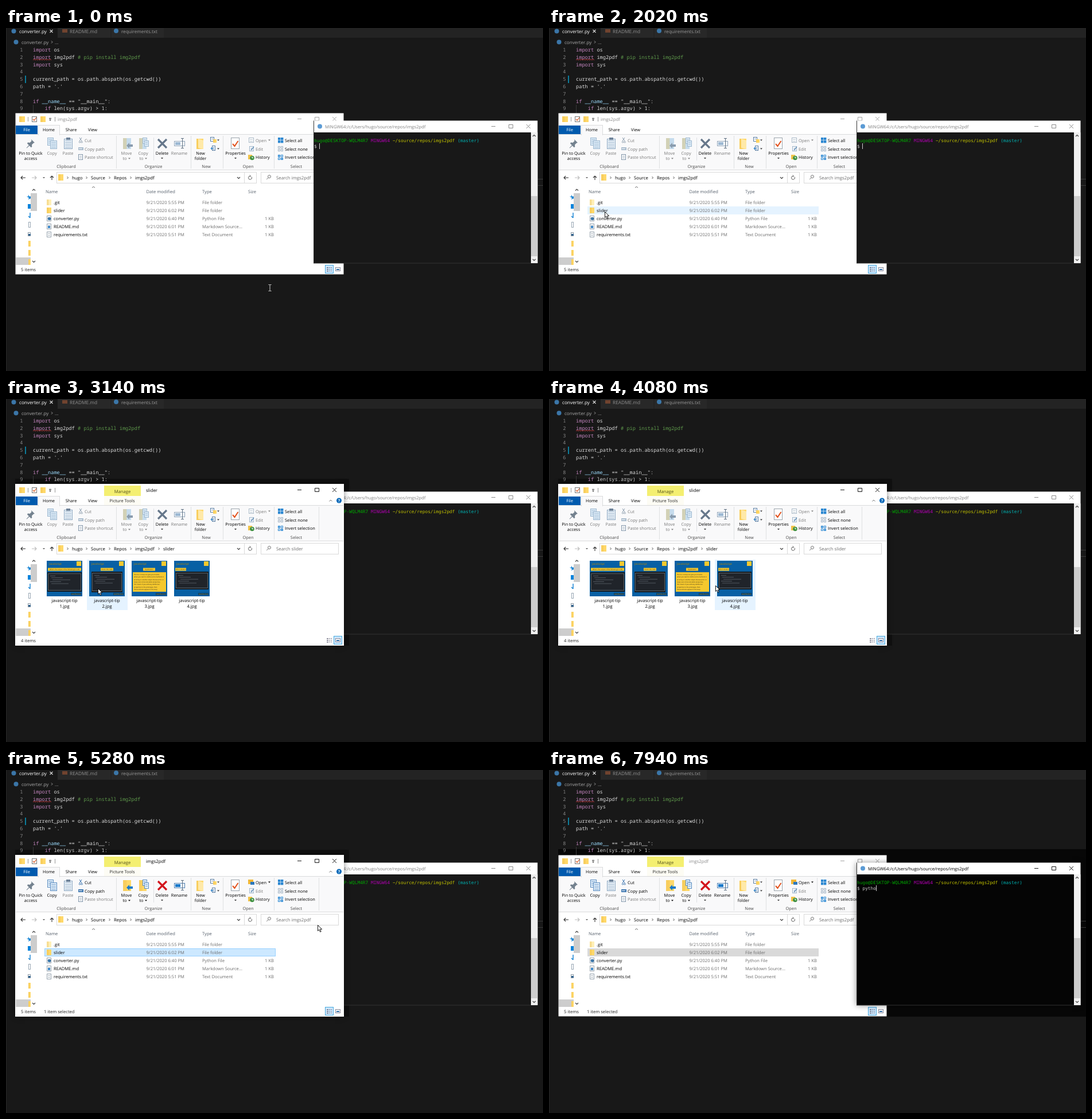
An HTML page with a canvas for the animation above (8000 ms loop, 936 by 598 pixels).

```html
<!DOCTYPE html>
<html lang="en">
<head>
<meta charset="utf-8">
<title>Desktop session</title>
<style>
  html, body { margin: 0; width: 100%; height: 100%; overflow: hidden; background: #181818; }
  canvas { display: block; }
</style>
</head>
<body>
<canvas id="stage" width="936" height="598"></canvas>
<script>
const g = document.getElementById('stage').getContext('2d');
const LOOP = 8000;
const USER = 'hugo', HOST = 'DESKTOP-WQLM4R7';

const ui = size => `${size}px "Open Sans", "Noto Sans", sans-serif`;
const CODE = '8.67px "Noto Sans Mono", "DejaVu Sans Mono", monospace';
const TERM = '7.84px "DejaVu Sans Mono", monospace';
const GREY = '#6d6d6d', BLUE = '#1979ca', GOLD = '#ffd869';

// Drawing helpers
function rect(color, x, y, w, h) {
  g.fillStyle = color;
  g.fillRect(x, y, w, h);
}
function frame(color, x, y, w, h, fillColor) {
  if (fillColor) rect(fillColor, x, y, w, h);
  g.strokeStyle = color;
  g.lineWidth = 1;
  g.strokeRect(x + .5, y + .5, w - 1, h - 1);
}
function fill(color, d) {
  g.fillStyle = color;
  g.fill(new Path2D(d));
}
function line(color, d, width = 1) {
  g.strokeStyle = color;
  g.lineWidth = width;
  g.stroke(new Path2D(d));
}
function dot(color, x, y, r) {
  g.fillStyle = color;
  g.beginPath();
  g.arc(x, y, r, 0, 7);
  g.fill();
}
function text(s, x, y, color = '#000', font = ui(7.6), align = 'left') {
  g.font = font;
  g.textAlign = align;
  g.fillStyle = color;
  g.fillText(s, x, y);
}
const label = (s, x, y, color = '#000') => text(s, x, y, color, ui(7.4));
const caption = (s, x, y, color = '#000') => text(s, x, y, color, ui(7.4), 'center');
const drop = (x, y, color = '#333') => fill(color, `M${x - 2} ${y}h4l-2 2.2z`);
const chevron = (x, y, color = '#555') => line(color, `M${x - 1} ${y - 2}l2 2-2 2`);
const arrowUp = (x, y) => line('#444', `M${x - 2.5} ${y + 1.5}l2.5-2.5 2.5 2.5`, 1.2);
const arrowDown = (x, y) => line('#444', `M${x - 2.5} ${y - 1.5}l2.5 2.5 2.5-2.5`, 1.2);

function folder(x, y, w, h, color = GOLD) {
  rect(color, x, y, w, h);
  rect('#e9b94a55', x, y, w * .45, h);
}
function sheet(x, y, w, h, edge = '#9ab0c4', color = '#fff') {
  frame(edge, x, y, w, h, color);
  for (let i = 3; i < h - 2; i += 3) rect(edge, x + 2, y + i, w - 4, .8);
}
function windowButtons(x, y, color) {
  line(color, `M${x} ${y + .5}h7M${x + 30.5} ${y - 2.5}h7v6h-7zM${x + 61} ${y - 3}l7 7m0-7l-7 7`, .9);
}
function windowBox(x, y, w, h, color, active) {
  g.save();
  if (active) {
    g.shadowColor = 'rgba(0,0,0,.45)';
    g.shadowBlur = 10;
  }
  rect(color, x, y, w, h);
  g.restore();
}

// front: which window has the focus, its shadow darkens the ground around it
function editor(front) {
  rect('#181818', 0, 0, 936, 598);
  rect('#232323', 90, 0, 846, 17);
  rect('#282828', 90, 0, 92, 17);
  rect('#282828', 184, 0, 91, 17);
  rect('#262626', 0, 0, 1, 598);
  if (front === 'explorer') rect('#101010', 16, 139, 582, 291);
  if (front === 'terminal') rect('#070707', 16, 138, 920, 292);
  rect('#3a3a3a', 927, 263, 9, 1);
  rect('#3a3a3a', 927, 274, 9, 1);

  dot('#3b76a8', 13.5, 5.5, 4);
  text('converter.py', 23, 9, '#fff', ui(8.2));
  line('#ddd', 'M76.5 3l5 5m0-5l-5 5', 1.1);
  rect('#70432f', 98, 2, 9, 6);
  text('README.md', 111, 9, '#8f8f8f', ui(8.3));
  dot('#3b76a8', 192, 5, 4);
  text('requirements.txt', 201, 9, '#9a9a9a', ui(8.05));
  dot('#3b76a8', 17.5, 24.5, 4);
  text('converter.py', 27, 27.5, '#a9a9a9', ui(8.1));
  chevron(80, 24.5, '#a9a9a9');
  text('...', 85, 27.5, '#a9a9a9', ui(8.1));

  const source = ['import os', 'import img2pdf # pip install img2pdf', 'import sys', '',
    'current_path = os.path.abspath(os.getcwd())', "path = '.'", '',
    'if __name__ == "__main__":', '    if len(sys.argv) > 1:'];
  const inks = { import: '#c586c0', if: '#c586c0', __name__: '#9cdcfe' };
  source.forEach((s, i) => {
    const y = 41 + 12.8 * i;
    text(i + 1, 29.5, y, '#858585', CODE, 'right');
    let x = 47;
    for (const part of s.split(/(#.*| )/)) {
      text(part, x, y, part[0] === '#' ? '#5f9a4c' : inks[part] || '#dcdcdc', CODE);
      x += part.length * 5.2;
    }
  });
  let wave = 'M47 56';
  for (let i = 0; i < 8; i++) wave += 'l2-1.5 2 1.5';
  line('#d23c3c', wave, .8);
  rect('#0c7d9d', 33, 83, 2, 13);
  rect('#3a3a3a', 47, 134, 1, 16);
}

function terminal(active, typed, caret) {
  const ink = active ? '#000' : '#808080';
  windowBox(536, 161.5, 390.5, 248.5, '#fff', active);
  rect(active ? '#050505' : '#181818', 536, 182, 379, 228);
  rect('#333', 536, 161.5, 1, 248.5);
  rect('#333', 536, 409.5, 390, 1);
  dot('#5b9bd5', 547, 171.5, 4);
  text(`MINGW64:/c/Users/${USER}/source/repos/imgs2pdf`, 556, 174.5, ink, ui(7.7));
  windowButtons(846, 171, ink);
  rect('#f0f0f0', 915, 182, 11.5, 228);
  rect('#cdcdcd', 915, 293, 11, 105);
  arrowUp(920.5, 187.5);
  arrowDown(920.5, 404.5);

  let x = 537;
  const prompt = [[`${USER}@${HOST} `, '#00a800'], ['MINGW64 ', '#b000b0'],
    ['~/source/repos/imgs2pdf ', '#bfbf00'], ['(master)', '#00b0b0']];
  for (const [s, color] of prompt) {
    text(s, x, 199, color, TERM);
    x += s.length * 4.72;
  }
  text('$ ' + typed, 537, 208.5, '#c8c8c8', TERM);
  if (caret) rect('#d0d0d0', Math.round(546.4 + typed.length * 4.72), 201, 1, 10);
}

function titleBar({ active, manage, place }) {
  const ink = active ? '#000' : '#8a8a8a';
  folder(23, 154, 10, 10);
  rect('#999', 38, 155, 1, 8);
  frame('#777', 45, 154, 9, 10, '#fff');
  line('#d9541e', 'M47 159l2 2 4-5', 1.2);
  folder(60, 154, 9, 10);
  rect('#333', 75, 157, 4, 1);
  drop(77, 159.5);
  rect('#999', 85, 155, 1, 8);
  if (manage) {
    rect('#f4ef70', 171, 151, 64, 18);
    text('Manage', 203, 163.5, '#55511d', ui(7.7), 'center');
    rect('#fdfcf4', 171, 169, 64, 16);
    text('Picture Tools', 202.5, 180, '#222', ui(7.4), 'center');
  }
  text(place, manage ? 244 : 90, 161.5, ink, ui(7.8));
  windowButtons(508, 158, active ? '#000' : '#999');
}

function ribbon(sel) {
  const dim = sel ? '#000' : '#7b7b7b', off = '#7b7b7b';
  const edge = sel ? '#5a8cc0' : '#9fb9d0', soft = sel ? '#e4f0fb' : '#d8e8f5';
  rect('#f9f9fa', 17, 185, 571, 63);
  rect('#dadbdc', 17, 185, 571, 1);
  rect('#dadbdc', 17, 247, 571, 1);
  rect('#005aae', 17, 170, 38, 15);
  text('File', 36, 180, '#fff', ui(7.4), 'center');
  frame('#dadbdc', 56, 169, 38, 18, '#f9f9fa');
  rect('#f9f9fa', 57, 185, 36, 3);
  caption('Home', 74.5, 180);
  caption('Share', 113.5, 180);
  caption('View', 151, 180);
  line('#777', 'M563.5 178.5l2.5-2.5 2.5 2.5');
  dot('#0067b8', 580.5, 177, 4.5);
  text('?', 580.5, 179.7, '#fff', 'bold ' + ui(7.4), 'center');

  for (const x of [192, 322, 378, 467, 545]) rect('#dfe0e2', x, 188, 1, 57);
  rect('#dfe0e2', 257, 191, 1, 40);
  [['Clipboard', 105], ['Organize', 257], ['New', 349], ['Open', 422], ['Select', 506]]
    .forEach(([s, x]) => caption(s, x, 243.5, '#4a4a4a'));

  fill('#74828f', 'M44 194l6 6-2 .6-3 3 .3 3.4-1.6 1.2-3-3-4.5 4.3-.6-.6 4.3-4.7-3-3 1.2-1.6 3.4.3 3-3z');
  caption('Pin to Quick', 43, 221);
  caption('access', 43, 230);
  sheet(72, 191, 11, 14, edge, soft);
  sheet(77, 196, 12, 15, edge, soft);
  caption('Copy', 80, 221, dim);
  sheet(101, 193, 15, 18, '#8fa9c2', '#eaf2f9');
  rect('#6f8399', 105, 191, 7, 4);
  caption('Paste', 108, 221, off);

  line(sel ? '#3d76b0' : '#8fa0b0', 'M128 191l4 6m0-6l-4 6M128.5 197.5a1.3 1.3 0 1 0 .1 0M132 197.5a1.3 1.3 0 1 0 .1 0');
  rect(sel ? '#3d76b0' : '#a9bccd', 126, 208, 9, 5);
  rect('#fff', 127, 210, 6, 1);
  sheet(126, 220, 8, 10, '#8094a8', '#fff');
  label('Cut', 137, 198.5, dim);
  label('Copy path', 137, 213.5, dim);
  label('Paste shortcut', 137, 228, off);

  folder(204, 192, 14, 19, sel ? GOLD : '#c6dced');
  fill(sel ? '#1979ca' : '#8a9cae', 'M210 205l5-5v3h6v4h-6v3z');
  caption('Move', 210, 221, dim);
  caption('to', 207, 230, dim);
  drop(215, 226.5, dim);
  folder(232, 192, 13, 19, sel ? GOLD : '#c6dced');
  sheet(238, 191, 8, 11, edge, soft);
  sheet(241, 196, 8, 11, edge, soft);
  caption('Copy', 239, 221, dim);
  caption('to', 236, 230, dim);
  drop(244, 226.5, dim);
  line(sel ? '#d3141c' : '#66778b', 'M265 194l15 15m0-15l-15 15', 3.2);
  caption('Delete', 272, 221);
  drop(272, 226);
  frame(sel ? '#4b7db1' : '#8ea3b8', 293, 197, 19, 9, '#fff');
  rect(sel ? BLUE : '#9db9d3', 295, 199, 9, 5);
  line('#5d6e80', 'M305 192.5h5M307.5 192.5v17M305 209.5h5');
  caption('Rename', 302, 221, dim);

  folder(332, 193, 12, 18);
  fill('#ffe9a8', 'M335 193l9 3v15l-9-2z');
  caption('New', 339, 221);
  caption('folder', 339, 230);
  sheet(356, 190, 7, 8, '#5a7ea3');
  folder(361, 194, 6, 6);
  sheet(359, 205, 6, 9, '#5a7ea3');
  line('#1979ca', 'M362 210h-5m2-2l-2 2 2 2');
  drop(370, 194.5);
  drop(370, 209.5);

  frame('#9aa3ab', 392, 191, 15, 20, '#fff');
  line('#e2511c', 'M395 202l3.5 4 6-9', 2);
  caption('Properties', 400, 221);
  drop(400, 226);
  if (sel) folder(422, 191, 9, 8, '#f3b631');
  else sheet(423, 191, 9, 9, '#aab9c7');
  if (sel) rect('#2c78bd', 426, 195, 7, 5);
  sheet(424, 206, 8, 9, '#9db4c8');
  line('#5f8cb5', 'M427 213l5-6', 1.3);
  folder(422, 221, 7, 8, '#f3c64b');
  dot('#3f9142', 429, 226.5, 3.8);
  line('#fff', 'M429 224v2.5h2');
  label('Open', 435, 198.5, dim);
  drop(459, 194.5, dim);
  label('Edit', 435, 213.5, off);
  label('History', 435, 228);

  for (let i = 0; i < 4; i++) {
    const x = 474 + i % 2 * 5, y = 191 + (i >> 1) * 5;
    rect('#2b87d1', x, y, 4.4, 4.4);
    frame('#a3b4c4', x, y + 15, 4, 4);
    frame('#2b87d1', x, y + 30, 4, 4, i % 3 ? '#fff' : '#7db9e8');
  }
  label('Select all', 486, 198.5);
  label('Select none', 486, 213.5);
  label('Invert selection', 486, 228);
}

function addressBar({ view, place, crumbHot }) {
  line('#333', 'M34 261h-8m3-3l-3 3 3 3', 1.1);
  line('#bbb', 'M45 261h8m-3-3l3 3-3 3', 1.1);
  drop(66, 260, '#666');
  line('#333', 'M80 265v-7m-3 3l3-3 3 3', 1.1);
  frame('#d9d9d9', 88, 251, 328, 20);
  frame('#d9d9d9', 415, 251, 22, 20);
  frame('#d9d9d9', 444, 251, 136, 20);
  folder(91, 255, 9, 11);
  if (crumbHot) frame('#99d1ff', 222, 251, 40, 20, '#cce8ff');
  const crumbs = [[USER, 115], ['Source', 148], ['Repos', 188], ['imgs2pdf', 225]];
  if (view === 'thumbs') crumbs.push(['slider', 274]);
  for (const [s, x] of crumbs) {
    chevron(x - 7.5, 261);
    text(s, x, 263.5, '#000', ui(7.75));
  }
  arrowDown(405.5, 261.5);
  line('#555', 'M428 259.5a3 3 0 1 1-2.5-1.4M424.8 256.4l1.8 1.7-1.8 1.8');
  line('#777', 'M461.5 259a2.5 2.5 0 1 1-5 0 2.5 2.5 0 1 1 5 0M457.2 261l-3 3');
  text('Search ' + place, 471, 263.5, GREY, ui(7.8));
}

function navPane() {
  rect('#cdcdcd', 43, 288, 11, 31);
  rect('#cdcdcd', 17, 400, 26, 13);
  arrowUp(48.5, 282);
  arrowDown(48.5, 407.5);
  fill('#1e88d6', 'M39 290.5l1.4 3H43v4.5l-1-.8-3 2 .8-3.2-4-2.3h2.8z');
  rect('#0b84dc', 38, 307, 5, 8);
  line('#1e88d6', 'M42 322v9m-3-3l3 3', 1.5);
  sheet(39, 338, 4, 10, '#9aa8b5');
  frame('#8d9aa6', 38, 356, 5, 7, '#fff');
  rect('#33648f', 39, 359, 4, 3);
  for (const y of [371, 387, 403]) folder(39, y, 4, 10);
}

function headers(ruled) {
  [['Name', 69], ['Date modified', 244.5], ['Type', 342], ['Size', 422]]
    .forEach(([s, x]) => text(s, x, 287.5, '#56606c'));
  line('#666', 'M150 278.5l2.5-2 2.5 2');
  if (ruled) for (const x of [240, 337, 418, 472]) rect('#e5e5e5', x, 276, 1, 18);
}

const FILES = [
  ['.git', '5:55', 'File folder'],
  ['slider', '6:02', 'File folder'],
  ['converter.py', '6:40', 'Python File', '1 KB'],
  ['README.md', '6:01', 'Markdown Source...', '1 KB'],
  ['requirements.txt', '5:51', 'Text Document', '1 KB'],
];

function fileList({ sel, grey, hot }) {
  headers(false);
  FILES.forEach(([name, time, type, size = ''], i) => {
    const y = 297 + 14.1 * i, top = Math.round(y);
    if (sel && i === 1) {
      if (grey) rect('#d9d9d9', 67, top, 403, 14);
      else frame('#99d1ff', 67, top, 403, 14, '#cce8ff');
    } else if (hot === i) rect('#e5f3ff', 67, top, 403, 14);
    if (i < 2) folder(71, top + 2, 8, 10, i ? GOLD : '#fff0b8');
    else sheet(71, top + 2, 8, 10, '#98a4af');
    if (i === 2) dot('#3b76a8', 75.5, top + 7.5, 2.8);
    if (i === 3) rect('#3a86c8', 73, top + 6, 4, 4);
    text(name, 83, y + 9.7);
    text(`9/21/2020 ${time} PM`, 244.5, y + 9.7, GREY);
    text(type, 342, y + 9.7, GREY);
    text(size, 467, y + 9.7, GREY, ui(7.6), 'right');
  });
}

const NOTE = ['The for..in loop can give you trouble', 'when you want to define extra methods in',
  'an array or another object. Because for..in', 'loops over all enumerable properties,',
  'this means if you add any additional', 'properties to the prototype, then', 'those will also appear in the loop'];
// Per card: heading with its x and width, then panel x, y, width, height
const CARDS = [
  ["What's the output of the following JS code", 2, 58, 1, 20, 60, 34],
  ["Here's the code", 20, 22, 4, 19, 54, 36],
  ['Explanation', 20, 21, 2, 20, 58, 34],
  ['Other solution', 2, 19, 2, 19, 58, 31],
];

function thumbs(hot) {
  CARDS.forEach(([head, hx, hw, px, py, pw, ph], i) => {
    const x = 71 + 74 * i, y = 282;
    if (hot === i) rect('#e5f3ff', x - 4, 280, 71, 88);
    rect('#0860a4', x, y, 62, 62);
    text('JavaScript', x + 4, y + 6.5, '#8a7d2e', 'bold ' + ui(4.4));
    rect('#f5c82e', x + 52, y + 1, 8, 8);
    rect('#f5c82e', x + hx, y + 12.5, hw, 5);
    text(head, x + hx + hw / 2, y + 16.2, '#222', ui(2.7), 'center');
    if (i === 2) {
      rect('#f5c82e', x + px, y + py, pw, ph);
      NOTE.forEach((s, k) => text(s, x + px + 2, y + py + 5 + k * 4.3, '#222', ui(2.65)));
    } else {
      rect('#15191d', x + px, y + py, pw, ph);
      frame('#59646c', x + px + 1, y + py + 2, pw - 2, ph - 4, '#20242a');
      for (let k = 0; k < 5; k++)
        rect('#646c74', x + px + 5 + k % 3 * 2, y + py + 6 + k * 3.4, 9 + k * 11 % 23, .7);
    }
    rect('#0a3f66', x + 42, y + 56, 18, 4);
    text('read the docs', x + 51, y + 59, '#e0bd3c', ui(2.6), 'center');
    text('javascript-tip', x + 31, 354, '#000', ui(7.6), 'center');
    text(`${i + 1}.jpg`, x + 31, 364, '#000', ui(7.6), 'center');
  });
}

function statusBar({ view, sel }) {
  text(view === 'files' ? '5 items' : '4 items', 26, 424, '#222');
  if (sel) text('1 item selected', 66, 424, '#222');
  frame('#4aa8dc', view === 'thumbs' ? 571 : 556, 413, 15, 15, '#cce8ff');
  for (let y = 417; y < 425; y += 3) {
    rect('#778', 559, y, 3, 1.5);
    rect('#778', 563, y, 2, 1);
    rect('#778', 566, y, 2, 1);
  }
  frame('#889', 574, 417, 9, 7, '#fff');
  rect('#2d6ca8', 576, 420, 5, 2);
}

function explorer(s) {
  const grow = s.active ? 1 : .5;
  windowBox(17 - grow, 149 - grow, 571 + 2 * grow, 280 + 2 * grow, '#fff', s.active);
  titleBar(s);
  ribbon(s.sel);
  addressBar(s);
  navPane();
  if (s.view === 'files') fileList(s);
  else if (s.view === 'thumbs') thumbs(s.hot);
  else {
    headers(true);
    text('Working on it...', 322, 311, GREY, ui(7.6), 'center');
  }
  statusBar(s);
}

// Pointer moves: first step, last step, step count, destination
const MOVES = [
  [1210, 1910, 7, 105, 301], [2020, 2020, 1, 97, 320], [2120, 2230, 2, 97, 323],
  [2910, 3140, 3, 160, 330], [3260, 3840, 6, 300, 330], [4080, 4080, 1, 290, 325],
  [4200, 4800, 6, 244, 254], [5040, 5530, 5, 626, 274], [5770, 6220, 5, 639, 270],
];

function pointerAt(t) {
  let x = 460, y = 453;
  for (const [from, to, n, tx, ty] of MOVES) {
    if (t < from) break;
    const step = t >= to ? n : 1 + Math.floor((t - from) / (to - from) * (n - 1));
    const k = 1 - (1 - step / n) ** 3;
    x += (tx - x) * k;
    y += (ty - y) * k;
  }
  return [x, y];
}

function pointer(x, y, beam) {
  g.save();
  g.translate(Math.round(x), Math.round(y));
  if (beam) line('#d0d0d0', 'M-2.5-5.5h2l.5.5.5-.5h2M0-5V5M-2.5 5.5h2l.5-.5.5.5h2');
  else {
    const d = 'M.5.5V10.5l2.3-2.2 1.7 4 1.7-.7-1.7-3.9H7.7z';
    fill('#fff', d);
    line('#000', d, .9);
  }
  g.restore();
}

function hotItem(view, x, y) {
  if (x < 67 || y > 368) return -1;
  if (view === 'thumbs') return y >= 280 ? Math.floor((x - 67) / 74) : -1;
  return x < 470 && y >= 297 ? Math.floor((y - 297) / 14.1) : -1;
}

function draw(t) {
  const [x, y] = pointerAt(t);
  const view = t < 2910 ? 'files' : t < 4920 ? 'thumbs' : t < 5040 ? 'busy' : 'files';
  const front = t < 2450 ? 'none' : t < 5650 ? 'explorer' : 'terminal';
  const active = front === 'explorer';
  const typed = 'pytho'.slice(0, [6960, 7200, 7700, 7820, 7940].filter(k => k <= t).length);
  const caret = t < 6220 || t >= 6710;
  const files = {
    active, view,
    manage: t >= 2450,
    sel: t >= 2450 && view === 'files',
    grey: t >= 5770,
    place: view === 'thumbs' ? 'slider' : 'imgs2pdf',
    hot: hotItem(view, x, y),
    crumbHot: x >= 222 && x < 262 && y >= 251 && y < 271,
  };

  editor(front);
  if (active) {
    terminal(false, typed, caret);
    explorer(files);
  } else {
    explorer(files);
    terminal(front === 'terminal', typed, caret);
  }
  const overTerm = x > (active ? 589 : 536) && x < 915 && y > 182 && y < 410;
  if (t < 6960) pointer(x, y, overTerm || y > 430);
}

g.textRendering = 'geometricPrecision';
function tick() {
  draw(performance.now() % LOOP);
  requestAnimationFrame(tick);
}
tick();
</script>
</body>
</html>
```
